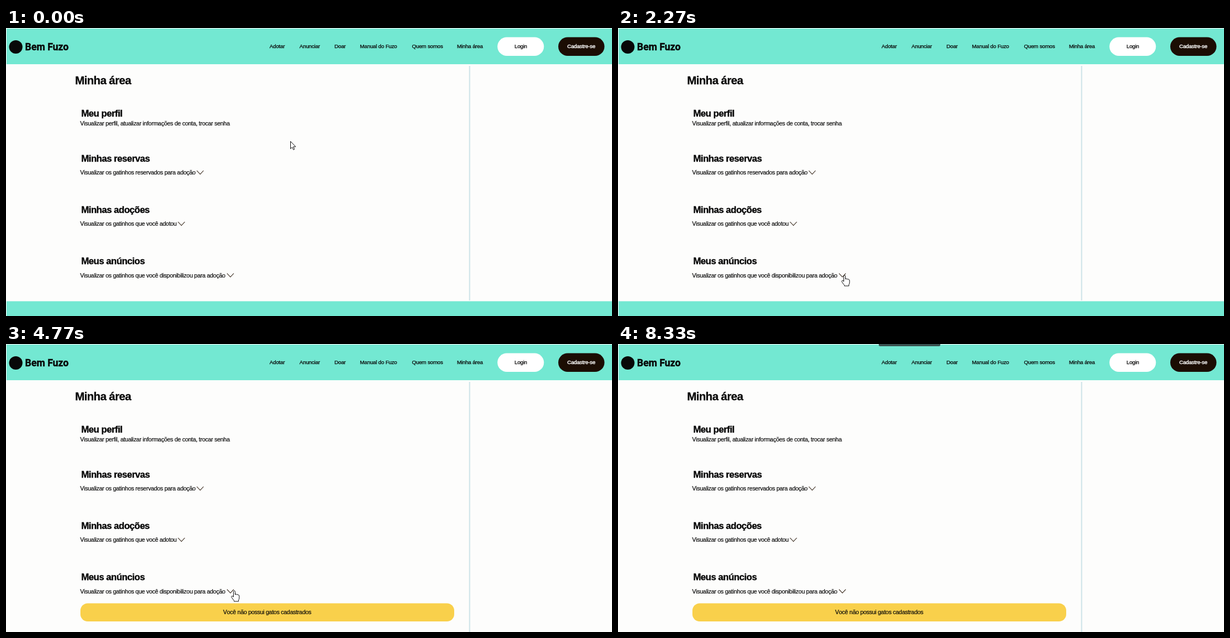
Animation, 1083 px wide and 517 px high, one loop 8.36 s. Source, as an HTML page:

```html
<!DOCTYPE html>
<html lang="pt-BR">
<head>
<meta charset="utf-8">
<title>Minha área</title>
<style>
  html, body { margin: 0; width: 100%; height: 100%; overflow: hidden; background: #fdfdfc; }
  svg { display: block; width: 1083px; height: 517px; }
  text { font-family: "Liberation Sans", Arial, sans-serif; font-kerning: none; fill: #080808; stroke: #080808; }
  .brand { font: bold 17.5px Roboto, sans-serif; stroke-width: .4px; }
  .nav { font-size: 9.7px; letter-spacing: -.23px; stroke-width: .25px; }
  .light { fill: #fff; stroke: #fff; stroke-width: .4px; }
  .title { font-size: 20.3px; font-weight: bold; letter-spacing: -.6px; stroke-width: .3px; }
  .head { font-size: 16.6px; font-weight: bold; letter-spacing: -.5px; stroke-width: .35px; }
  .sub { font-size: 10.5px; letter-spacing: -.27px; stroke-width: .2px; }
  .mid { text-anchor: middle; }
  .teal { fill: #73e8d2; }
  .chevron { fill: none; stroke: #2a1a0c; stroke-width: 1.1; }
  .pointer { fill: #fff; stroke: #111; stroke-width: 1; stroke-linejoin: round; }
</style>
</head>
<body>
<svg id="stage" viewBox="0 0 1083 517">
  <rect width="1083" height="517" fill="#fdfdfc"/>
  <rect class="teal" x="1" y="1" width="1082" height="64"/>
  <circle cx="17.5" cy="34" r="12" fill="#080808"/>
  <rect x="878.3" y="16.5" width="83" height="33.5" rx="16.75" fill="#fff"/>
  <rect x="987" y="16.5" width="82.5" height="33.5" rx="16.75" fill="#1b0d03"/>
  <rect id="divider" x="827.5" y="68" width="2" height="421" fill="#cde3e8"/>
  <rect id="footer" class="teal" x="1" y="490.5" width="1082" height="26.5"/>
  <g id="labels"></g>
  <g id="notice">
    <rect x="133" y="465.5" width="668" height="32.5" rx="13" fill="#f9d04b"/>
    <text class="sub mid" x="466.8" y="485">Você não possui gatos cadastrados</text>
  </g>
  <path id="bar" d="M466 0H576V1.5Q576 4 573.5 4H468.5Q466 4 466 1.5Z" fill="#39504f"/>
  <g id="cursor">
    <path id="arrow" class="pointer" d="M.5 .5V13.8L3.5 11L5.6 15.6L7.6 14.7L5.5 10.1H9.7Z"/>
    <path id="hand" class="pointer" d="M-1.5 11V1.5a1.5 1.5 0 0 1 3 0V7q.3-1 1.5-1t1.5 1.3q.3-.8 1.4-.8t1.3 1.3q1.3-.4 1.6 1V13q0 2-1.2 3.5V19H-.5V17.5Q-2.5 15.5-5 11.5Q-5.5 10-4.2 9.4Q-3 9.2-1.5 11Z"/>
  </g>
</svg>
<script>
const LOOP = 8360;
const OPEN_AT = 2430;
const HAND_FROM = 1900, HAND_TO = 5160;
const GONE_AT = 5830;
const BAR_FROM = 6800, BAR_TO = 7060;

// time, x, y of the pointer tip
const path = [
  [0, 508, 203],
  [120, 508, 203],
  [680, 426, 476],
  [870, 416, 452],
  [1300, 409, 444],
  [1750, 409, 444],
  [2000, 405, 444],
  [2600, 405, 444],
  [3100, 407, 443],
  [4400, 408, 443],
  [5080, 408, 443],
  [GONE_AT, 520, -20]
];

const $ = id => document.getElementById(id);
const labels = $('labels');

function add(tag, attrs, content = '') {
  const el = document.createElementNS('http://www.w3.org/2000/svg', tag);
  for (const key in attrs) el.setAttribute(key, attrs[key]);
  el.textContent = content;
  labels.append(el);
}

const write = (cls, x, y, content) => add('text', { class: cls, x, y }, content);

write('brand', 34, 40, 'Bem Fuzo');
for (const [x, name] of [
  [471, 'Adotar'], [524.5, 'Anunciar'], [587, 'Doar'],
  [632.5, 'Manual do Fuzo'], [725.5, 'Quem somos'], [806, 'Minha área']
]) write('nav', x, 36, name);
write('nav mid', 920, 36, 'Login');
write('nav mid light', 1028, 36, 'Cadastre-se');
write('title', 123.5, 101, 'Minha área');

// heading, its baseline, description, its baseline, chevron x
for (const [head, y, sub, subY, chevron] of [
  ['Meu perfil', 159, 'Visualizar perfil, atualizar informações de conta, trocar senha', 175],
  ['Minhas reservas', 240, 'Visualizar os gatinhos reservados para adoção', 263, 341],
  ['Minhas adoções', 332, 'Visualizar os gatinhos que você adotou', 355, 307.5],
  ['Meus anúncios', 424, 'Visualizar os gatinhos que você disponibilizou para adoção', 447.5, 395]
]) {
  write('head', 134.5, y, head);
  write('sub', 132.5, subY, sub);
  if (chevron) add('path', { class: 'chevron', d: `M${chevron} ${subY - 7}l6 6.5l6-6.5` });
}

const clamp = v => Math.min(1, Math.max(0, v));
const ease = v => v * v * (3 - 2 * v);
const show = (id, on) => $(id).setAttribute('visibility', on ? 'visible' : 'hidden');

function pointerAt(t) {
  const next = path.findIndex(p => p[0] > t);
  if (next < 0) return path[path.length - 1].slice(1);
  const [t0, x0, y0] = path[next - 1];
  const [t1, x1, y1] = path[next];
  const k = ease((t - t0) / (t1 - t0));
  return [x0 + (x1 - x0) * k, y0 + (y1 - y0) * k];
}

function draw(t) {
  const open = t >= OPEN_AT;
  const hand = t >= HAND_FROM && t < HAND_TO;
  const visible = t < GONE_AT;
  const [x, y] = pointerAt(t).map(Math.round);
  $('cursor').setAttribute('transform', `translate(${x} ${y})`);
  show('arrow', visible && !hand);
  show('hand', visible && hand);
  show('notice', open);
  show('footer', !open);
  $('divider').setAttribute('height', open ? 449 : 421);
  $('bar').setAttribute('opacity', clamp((t - BAR_FROM) / (BAR_TO - BAR_FROM)));
}

const start = performance.now();
function tick() {
  draw((performance.now() - start) % LOOP);
  requestAnimationFrame(tick);
}
tick();
</script>
</body>
</html>
```
